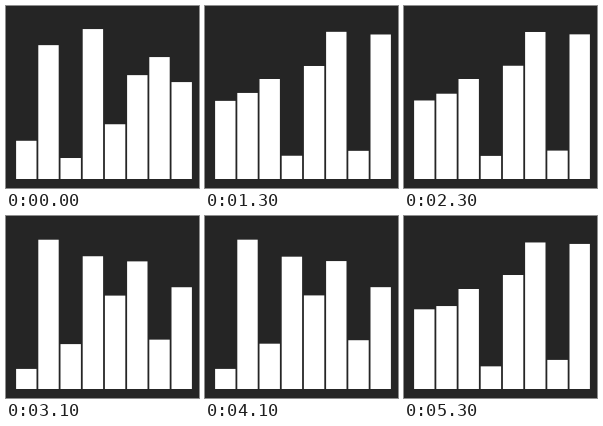
These frames come from a looping animation (193x182 px, 5.4 s). An HTML page:

```html
<!DOCTYPE html>
<html lang="en">
<head>
<meta charset="utf-8">
<title>Bars</title>
<style>
  html, body { margin: 0; width: 100%; height: 100%; overflow: hidden; background: #252525; }
  svg { display: block; }
  rect { fill: #fff; }
</style>
</head>
<body>
<svg id="stage" width="193" height="182" viewBox="0 0 193 182"></svg>
<script>
  const LOOP = 5400, STEP = 100, CYCLE = 999;
  const LEFT = 10.1, PITCH = 22.2, WIDTH = 20.4, BASE = 173;
  const HEIGHTS = [150, 20, 100];          // each bar cycles through these
  const OFFSETS = [1, 6, 2, 7, 3, 5, 0, 4]; // eighths of a cycle, per bar
  const START = 0.114;

  // cubic-bezier(.5, 0, .5, 1), solved by bisection
  function ease(p) {
    let lo = 0, hi = 1, s = 0.5;
    for (let i = 0; i < 24; i++) {
      s = (lo + hi) / 2;
      const x = 1.5 * s * (1 - s) + s ** 3;
      if (x < p) lo = s; else hi = s;
    }
    return s * s * (3 - 2 * s);
  }

  function heightAt(phase) {
    const n = HEIGHTS.length;
    const pos = (phase % 1) * n;
    const i = Math.floor(pos);
    const from = HEIGHTS[i], to = HEIGHTS[(i + 1) % n];
    return from + (to - from) * ease(pos - i);
  }

  function barFrames(offset) {
    const count = LOOP / STEP;
    return Array.from({ length: count + 1 }, (_, k) => {
      const h = heightAt(START + offset / 8 + k * STEP / CYCLE);
      return {
        offset: k / count,
        y: (BASE - h).toFixed(2) + 'px',
        height: h.toFixed(2) + 'px',
        easing: 'steps(1, end)'
      };
    });
  }

  const stage = document.getElementById('stage');
  OFFSETS.forEach((offset, i) => {
    const bar = document.createElementNS(stage.namespaceURI, 'rect');
    bar.setAttribute('x', (LEFT + i * PITCH).toFixed(2));
    bar.setAttribute('width', WIDTH);
    stage.append(bar);
    bar.animate(barFrames(offset), { duration: LOOP, iterations: Infinity });
  });
</script>
</body>
</html>
```
